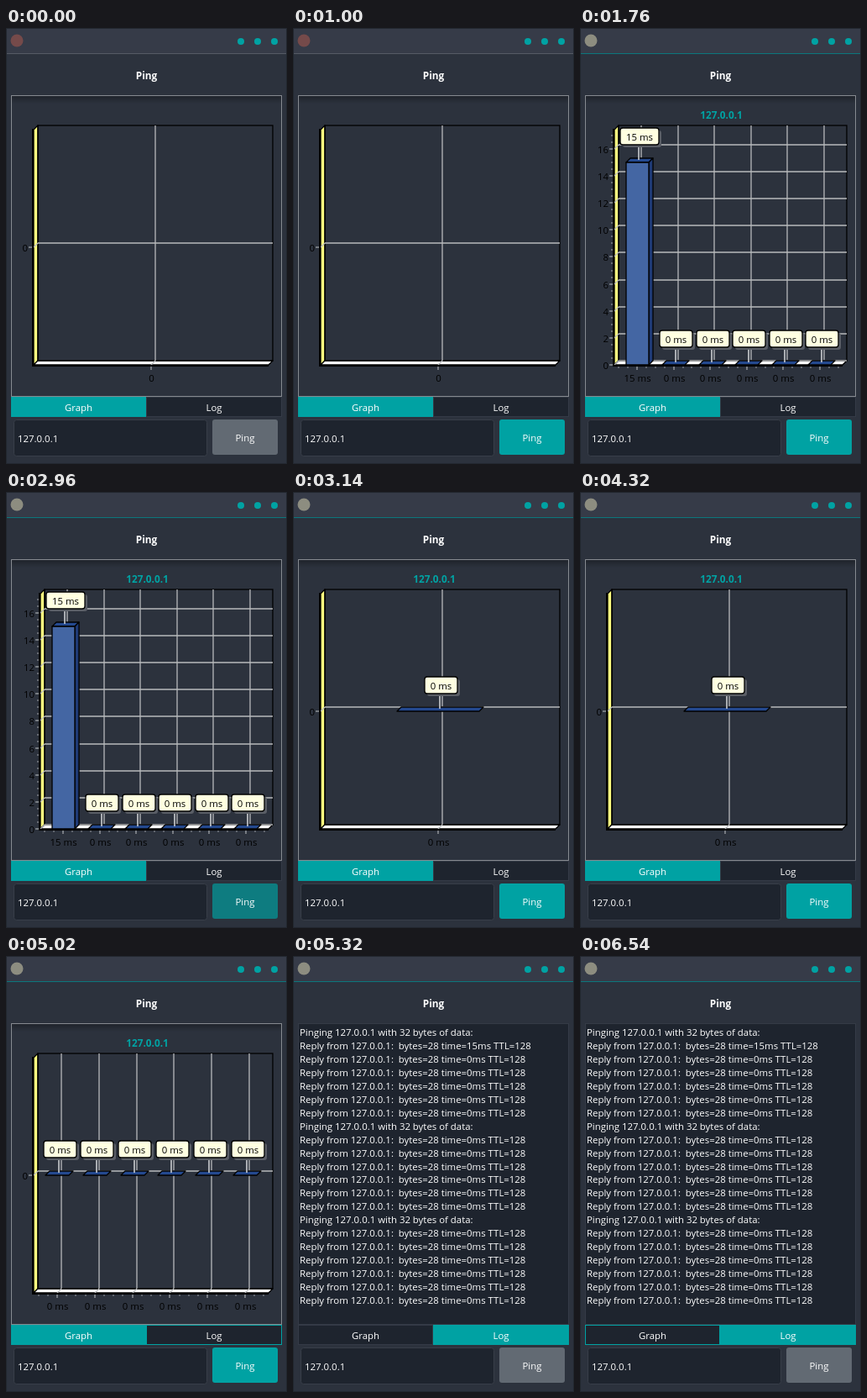
These frames come from a looping animation (335 by 519 pixels, 8000 ms). An HTML page:

```html
<!DOCTYPE html>
<html lang="en">
<head>
<meta charset="utf-8">
<title>Ping</title>
<style>
html, body { margin: 0; width: 100%; height: 100%; overflow: hidden; background: #2c323d; }
svg { display: block; width: 335px; height: 519px; }
text { font-family: "Open Sans", "Noto Sans", sans-serif; font-size: 11.4px; font-weight: 500; white-space: pre; }
.bold { font-weight: 700; font-size: 11.8px; }
</style>
</head>
<body>
<svg id="stage" viewBox="0 0 335 519" xmlns="http://www.w3.org/2000/svg"></svg>
<script>
const LOOP = 8000;
const TEAL = "#00a2a3", DARK = "#1e242e", EDGE = "#343a46", GRID = "#b8babd";
const BUTTON = { idle: "#626a73", hover: TEAL, down: "#0e7c80" };
const TOP = 116, FLOOR = 396, RIGHT = 318, DEPTH = 5;
const UNIT = 16.07;
const HAIR = 1.3; // chart strokes sit between pixels and look soft

// Each step holds until the next one starts.
const steps = [
  { at: 0, active: false, button: "idle", bars: [], title: false, page: "graph", hot: "" },
  { at: 1000, button: "hover" },
  { at: 1510, button: "down", active: true },
  { at: 1760, button: "hover", bars: [15, 0, 0, 0, 0, 0], title: true },
  { at: 2960, button: "down" },
  { at: 3140, button: "hover", bars: [0] },
  { at: 3190, bars: [0, 0, 0] },
  { at: 3240, bars: [0, 0, 0, 0, 0, 0] },
  { at: 4180, button: "down" },
  { at: 4320, button: "hover", bars: [0] },
  { at: 4390, bars: [0, 0, 0, 0] },
  { at: 4420, bars: [0, 0, 0, 0, 0, 0] },
  { at: 5020, hot: "log" },
  { at: 5320, page: "log", hot: "", button: "idle" },
  { at: 6540, hot: "graph" }
];
for (let i = 1; i < steps.length; i++) steps[i] = { ...steps[i - 1], ...steps[i] };

const rect = (x, y, w, h, fill, more = "") =>
  `<rect x="${x}" y="${y}" width="${w}" height="${h}" fill="${fill}" ${more}/>`;
const line = (x1, y1, x2, y2, color, width = HAIR) =>
  `<path d="M${x1} ${y1}L${x2} ${y2}" stroke="${color}" stroke-width="${width}"/>`;
const poly = (points, fill) =>
  `<polygon points="${points}" fill="${fill}" stroke="#000" stroke-width="${HAIR}" stroke-linejoin="round"/>`;
const text = (x, y, words, fill = "#fff", more = "") =>
  `<text x="${x}" y="${y}" fill="${fill}" ${more}>${words}</text>`;
const MID = 'text-anchor="middle"';
const OUTLINE = `stroke="#000" stroke-width="${HAIR}"`;
const { round } = Math;

function mark(x, y, words) {
  const w = words.length > 4 ? 46 : 39;
  const left = round(x - w / 2);
  return rect(left + 3, y + 3, w, 20, "#5a5e66", 'rx="3"') +
    rect(left, y, w, 20, "#ffffe1", 'rx="3" ' + OUTLINE) +
    text(left + w / 2, y + 15, words, "#000", MID);
}

function bar(x, w, base, value) {
  const l = round(x - DEPTH - w / 2), r = round(x - DEPTH + w / 2);
  const y = round(base - value * UNIT);
  const lid = poly([l, y, l + DEPTH, y - DEPTH, r + DEPTH, y - DEPTH, r, y], "#24498f");
  if (!value) return lid;
  return lid +
    poly([r, y, r + DEPTH, y - DEPTH, r + DEPTH, base - DEPTH, r, base], "#1f3a75") +
    poly([l, y, r, y, r, base, l, base], "#4466a3");
}

function chart({ bars, title }) {
  const n = bars.length;
  const scaled = Math.max(0, ...bars) > 0;
  const left = scaled ? 46 : 38;
  const front = left - DEPTH, bottom = FLOOR + DEPTH;
  const base = scaled ? bottom : 261;
  const w = 0.7 * (RIGHT - left) / (Math.max(n, 1) + 1);
  const gap = n > 1 ? (RIGHT - left - 2 * w) / (n - 1) : 0;
  const centers = n > 1 ? bars.map((_, i) => left + w + i * gap) : [(left + RIGHT) / 2];
  let back = "", ticks = "", solids = "", marks = "";

  const walls = poly([front, bottom, front, TOP + DEPTH, left, TOP, left, FLOOR], "#ffff80") +
    poly([front, bottom, left, FLOOR, RIGHT, FLOOR, RIGHT - DEPTH, bottom], "#fff") +
    rect(left, TOP, RIGHT - left, FLOOR - TOP, "none", OUTLINE);

  const levels = scaled ? [0, 2, 4, 6, 8, 10, 12, 14, 16] : [0];
  for (const v of levels) {
    const y = round(base - v * UNIT);
    back += line(left, y - DEPTH, RIGHT, y - DEPTH, GRID) + line(front, y, left, y - DEPTH, GRID);
    ticks += line(front - 6, y, front - 2, y, "#a0a3a8") +
      text(front - 7, y + 4.5, v, "#000", 'text-anchor="end"');
  }
  if (scaled) for (let v = 0; v < 17.3; v += 0.5) {
    const y = round(base - v * UNIT);
    ticks += line(front - 4, y, front - 2, y, "#7c8087");
  }

  centers.forEach((c, i) => {
    const x = round(c), fx = x - DEPTH;
    const words = n ? bars[i] + " ms" : "0";
    back += line(x, TOP, x, FLOOR, GRID) + line(fx, bottom, x, FLOOR, GRID);
    ticks += line(fx, bottom + 2, fx, bottom + 6, "#a0a3a8") +
      text(fx + 0.6, 420.5, words, "#000", MID);
    if (!n) return;
    solids += bar(c, w, base, bars[i]);
    const tip = round(base - bars[i] * UNIT) - 3, mx = round(c - 3);
    marks += line(mx, tip, mx, tip - 20, "#d5d7da", 1.5) + mark(c - 2, tip - 38, words);
  });
  if (gap) {
    const first = centers[0] - DEPTH;
    for (let k = -2; k < n * 4 - 1; k++) {
      const x = round(first + k * gap / 4);
      if (x > front && x < RIGHT - DEPTH) ticks += line(x, bottom + 2, x, bottom + 4, "#7c8087");
    }
  }

  const axes = line(front - 1, 120, front - 1, bottom + 2, "#000", 2) +
    line(front - 2, bottom + 1, RIGHT - DEPTH, bottom + 1, "#000", 2);
  const name = title ? text(168.5, 108, "127.0.0.1", TEAL, MID + ' class="bold"') : "";
  return rect(6, 80, 323, 359, "#2c323d") + rect(7, 81, 321, 9, "url(#shade)") +
    rect(6.5, 80.5, 322, 358, "none", 'stroke="#868a90"') +
    name + walls + back + axes + ticks + solids + marks;
}

function log() {
  let out = rect(6.5, 80.5, 322, 358, DARK, `stroke="${EDGE}"`), row = 0;
  const add = words => {
    out += text(8, 95 + 15.95 * row++, words);
  };
  for (let run = 0; run < 3; run++) {
    add("Pinging 127.0.0.1 with 32 bytes of data:");
    for (let i = 0; i < 6; i++)
      add(`Reply from 127.0.0.1:  bytes=28 time=${run + i ? 0 : 15}ms TTL=128`);
  }
  return out;
}

function tab(x, w, id, label, { page, hot }) {
  const on = page === id;
  return rect(x + .5, 439.5, w - 1, 23, on ? TEAL : DARK, `stroke="${on || hot === id ? TEAL : EDGE}"`) +
    text(x + w / 2, 456, label, "#fff", MID);
}

function windowFrame(active) {
  const dots = [280, 300, 320].map(x => `<circle cx="${x}" cy="16" r="4" fill="${TEAL}"/>`).join("");
  return `<linearGradient id="shade" x2="0" y2="1"><stop stop-opacity=".3"/><stop offset="1" stop-opacity="0"/></linearGradient>` +
    rect(0, 0, 335, 519, "#2c323d") +
    rect(0, 0, 335, 30, "#363b48") +
    line(1, 30.5, 334, 30.5, active ? "#0b777c" : "#565b65", 1) +
    rect(.5, .5, 334, 518, "none", 'stroke="#232830"') +
    `<circle cx="13" cy="15" r="7.5" fill="${active ? "#8d8d80" : "#754a4a"}"/>` + dots +
    text(167.5, 61, "Ping", "#fff", MID + ' class="bold"');
}

function scene(s) {
  return windowFrame(s.active) +
    (s.page === "graph" ? chart(s) : log()) +
    tab(6, 161, "graph", "Graph", s) + tab(167, 162, "log", "Log", s) +
    rect(9.5, 466.5, 230, 43, DARK, 'rx="3" stroke="#383e49"') +
    text(14, 493, "127.0.0.1") +
    rect(246, 466, 78, 42, BUTTON[s.button], 'rx="3"') +
    text(285, 492, "Ping", "#fff", MID);
}

const stage = document.getElementById("stage");
let shown = null;
function draw(time) {
  const t = time % LOOP;
  const step = steps.findLast(s => s.at <= t);
  if (step !== shown) {
    shown = step;
    stage.innerHTML = scene(step);
  }
}

const start = performance.now();
function tick() {
  draw(performance.now() - start);
  requestAnimationFrame(tick);
}
tick();
</script>
</body>
</html>
```
